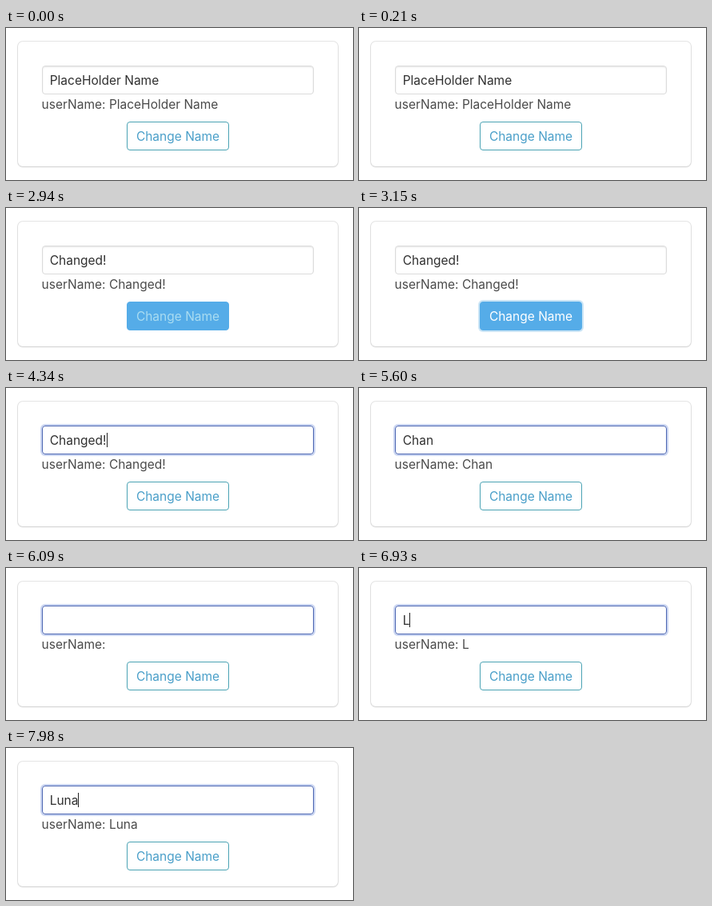
Recreate the animation shown at these times as an HTML page. Size 434 by 190 pixels, loop 8 s.

```html
<!DOCTYPE html>
<html lang="en">
<head>
<meta charset="utf-8">
<title>Change name</title>
<style>
  html, body { margin: 0; width: 100%; height: 100%; overflow: hidden; background: #fff; }
  #stage { position: relative; width: 434px; height: 190px; overflow: hidden; background: #fff; }
  .part { position: absolute; box-sizing: border-box; }
  #card {
    left: 15px; top: 17px; width: 400px; height: 156px; border-radius: 6px;
    box-shadow: 0 1px 2px rgba(10,10,10,.1), 0 0 0 1px rgba(10,10,10,.1);
  }
  #field {
    left: 45px; top: 47px; width: 340px; height: 36px; border-radius: 4px;
    border: 1px solid #dbdbdb; box-shadow: inset 0 1px 2px rgba(10,10,10,.1);
  }
  #field.focus { border-color: #4c66b2; box-shadow: 0 0 0 2px #cbd6f2; }
  #button {
    left: 151px; top: 117px; width: 128px; height: 36px; border-radius: 4px;
    border: 1px solid #4aa3b4;
  }
  #button.down, #button.up, #button.ring { background: #55ace8; border-color: #55ace8; }
  #button.up { box-shadow: 0 0 0 2px rgba(50,152,220,.12); }
  #button.ring { box-shadow: 0 0 0 2px rgba(50,152,220,.25); }
  svg { position: absolute; left: 0; top: 0; }
  text { font: 15.5px Inter, "Liberation Sans", sans-serif; white-space: pre; }
  #value { fill: #303030; }
  #echo { fill: #4a4a4a; }
  #caption { fill: #4a9fc9; text-anchor: middle; }
  #caption.down { fill: #a9dcf1; }
  #caption.up, #caption.ring { fill: #fff; }
</style>
</head>
<body>
<div id="stage">
  <div id="card" class="part"></div>
  <div id="field" class="part"></div>
  <div id="button" class="part"></div>
  <svg width="434" height="190" viewBox="0 0 434 190">
    <text id="value" x="54.7" y="71"></text>
    <text id="echo" x="44.6" y="101"></text>
    <text id="caption" x="215" y="141">Change Name</text>
    <rect id="caret" y="56" width="1" height="18" fill="#222"/>
  </svg>
</div>
<script>
  const LOOP = 8000;
  const FOCUS_AT = 4340;
  const $ = id => document.getElementById(id);
  const field = $('field'), button = $('button'), caption = $('caption');
  const value = $('value'), echo = $('echo'), caret = $('caret');

  // Each list holds [start time, state], in order.
  const names = [
    [0, 'PlaceHolder Name'], [2940, 'Changed!'],
    [5040, 'Changed'], [5250, 'Change'], [5390, 'Chang'], [5600, 'Chan'],
    [5740, 'Cha'], [5880, 'Ch'], [6020, 'C'], [6090, ''],
    [6930, 'L'], [7420, 'Lu'], [7630, 'Lun'], [7980, 'Luna']
  ];
  const carets = [
    [0, false], [FOCUS_AT, true], [4900, false], [5040, true],
    [5600, false], [6160, true], [6650, false], [6930, true]
  ];
  const presses = [[0, ''], [2940, 'down'], [3080, 'up'], [3150, 'ring'], [FOCUS_AT, '']];

  const at = (steps, t) => steps.filter(([start]) => start <= t).pop()[1];

  function setText(node, text) {
    if (node.textContent !== text) node.textContent = text;
  }

  function draw(t) {
    const name = at(names, t);
    const press = at(presses, t);
    setText(value, name);
    setText(echo, 'userName: ' + name);
    field.classList.toggle('focus', t >= FOCUS_AT);
    button.className = 'part ' + press;
    caption.setAttribute('class', press);
    const width = name ? value.getComputedTextLength() : 0;
    caret.setAttribute('x', Math.round(54.7 + width));
    caret.setAttribute('visibility', at(carets, t) ? 'visible' : 'hidden');
  }

  const origin = performance.now();
  function tick() {
    draw((performance.now() - origin) % LOOP);
    requestAnimationFrame(tick);
  }
  tick();
</script>
</body>
</html>
```
